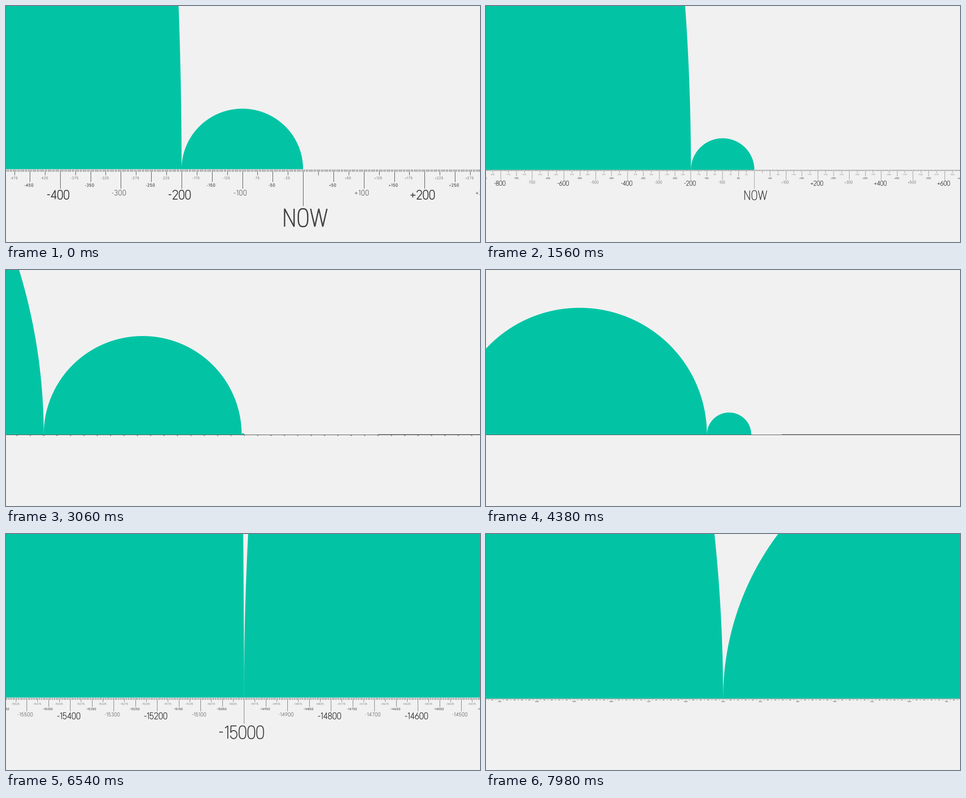
These frames come from a looping animation (1058 by 529 pixels, 8 s). A matplotlib script:

```python
import numpy as np
import matplotlib.pyplot as plt
from matplotlib.animation import FuncAnimation
from matplotlib.collections import LineCollection

W, H, DPI = 1058, 529, 92
PT = 72 / DPI
BG, GREEN, INK = "#f1f1f1", "#02c4a5", "#333333"
CX, CY = 529, 369          # zoom pivot in pixels
FULL = 1.356               # pixels per year when zoomed in
STEP, LOOP, TICK = 60, 8000, 20
PAN = (3125, 5400)
VIEW_A, VIEW_B = -98.9, -15002.2
SPANS = [(-100000, -15000), (-15000, -200), (-200, 0)]

# (ms, log of relative zoom)
ZOOM = np.array([
    (540, 0), (600, -.006), (1260, -.335), (1560, -.65), (2220, -1.715),
    (2700, -2.792), (3060, -3.816), (3450, -4.9), (3800, -5.4),
    (4080, -5.48), (4380, -5.312), (4740, -3.17), (5400, 0), (5460, 0)])
ZT, ZV = ZOOM.T
ZM = np.gradient(ZV, ZT)

# spacing, skip multiples of, tick length, label (y, cap, stroke, tracking, dx, colour)
LEVELS = [
    (1000, None, 60.5, (105.5, 40, 3.0, 0, 0, "#444444")),
    (200, 1000, 31.7, (54, 20, 2.0, .02, -4.7, "#444444")),
    (100, 200, 31.7, (49.5, 11.7, 1.35, .1, -5, "#808080")),
    (50, 100, 20.6, (32.5, 6.4, 1.25, .22, -2.5, "#6c6c6c")),
    (25, 50, 9.6, (16.5, 5.4, .95, .22, -2, "#969696")),
    (2.5, 25, 4, None),
]


def arc(cx, cy, rx, ry, a0=0, a1=360, power=1, n=15):
    a = np.radians(np.linspace(a0, a1, n))
    c, s = np.cos(a), np.sin(a)
    return np.column_stack([cx + rx * np.sign(c) * abs(c) ** power,
                            cy + ry * np.sign(s) * abs(s) ** power])


def line(*points):
    return np.array(points, float)


RING = arc(.25, .5, .25, .5, power=.72, n=33)
GLYPHS = {
    "0": [RING],
    "1": [line((0, .84), (.2, 1), (.2, 0))],
    "2": [np.vstack([arc(.25, .74, .25, .26, 175, -30), line((0, 0), (.5, 0))])],
    "3": [arc(.25, .76, .23, .24, 165, -90), arc(.25, .26, .25, .26, 90, -165)],
    "4": [line((.4, 0), (.4, 1), (0, .26), (.53, .26))],
    "5": [np.vstack([line((.46, 1), (.06, 1), (.03, .48)),
                     arc(.25, .32, .25, .32, 130, -165)])],
    "6": [arc(.25, .3, .25, .3), line((.01, .36), (.36, 1))],
    "7": [line((0, 1), (.5, 1), (.17, 0))],
    "8": [arc(.25, .76, .22, .24), arc(.25, .26, .25, .26)],
    "9": [arc(.25, .7, .25, .3), line((.49, .64), (.14, 0))],
    "+": [line((0, .45), (.5, .45)), line((.25, .2), (.25, .7))],
    "-": [line((0, .5), (.28, .5))],
    "N": [line((0, 0), (0, 1), (.5, 0), (.5, 1))],
    "O": [RING],
    "W": [line((0, 1), (.22, 0), (.43, 1), (.64, 0), (.86, 1))],
}
ADVANCE = {"1": .38, "-": .43, "N": .72, "W": 1.01}
EM = 1.06                  # glyph unit width relative to cap height


def zoom(t):
    """Cubic Hermite through the zoom keys."""
    i = int(np.clip(np.searchsorted(ZT, t, "right") - 1, 0, len(ZT) - 2))
    h = ZT[i + 1] - ZT[i]
    u = (t - ZT[i]) / h
    v = ((1 + 2 * u) * (1 - u) ** 2 * ZV[i] + u * (1 - u) ** 2 * h * ZM[i]
         + u * u * (3 - 2 * u) * ZV[i + 1] + u * u * (u - 1) * h * ZM[i + 1])
    return FULL * np.exp(v)


def ease(u):
    u = min(max(u, 0), 1)
    return 4 * u ** 3 if u < .5 else 1 - 4 * (1 - u) ** 3


def camera(t):
    if t >= 5880:
        return zoom(t - 5280), VIEW_B
    t = min(max(t, 540), 5400)
    u = ease((t - PAN[0]) / (PAN[1] - PAN[0]))
    return zoom(t), VIEW_A + (VIEW_B - VIEW_A) * u


def caption(year):
    if year == 0:
        return "NOW"
    if year == 25:
        return ""
    return "+50" if year == 75 else f"{year:+d}"


def text_strokes(text, x, y, cap, tracking):
    """Strokes of a label centred on x, y."""
    em = EM * cap
    steps = [ADVANCE.get(c, .65) + tracking for c in text]
    left = x - em * (sum(steps) - .15 - tracking) / 2
    out = []
    for char, step in zip(text, steps):
        for stroke in GLYPHS[char]:
            out.append(stroke * (em, -cap) + (left, y + cap / 2))
        left += step * em
    return out


def dome(a, b, s, view, base):
    """Visible part of the half circle between two years."""
    r = (b - a) / 2 * s
    mid = CX + ((a + b) / 2 - view) * s
    th = np.linspace(0, np.arcsin(min(1, (base + 5) / r)), 120)
    dx, y = r * np.cos(th), base - r * np.sin(th)
    x = np.concatenate([mid + dx, (mid - dx)[::-1]])
    return np.column_stack([np.clip(x, -60, W + 60), np.concatenate([y, y[::-1]])])


fig = plt.figure(figsize=(W / DPI, H / DPI), dpi=DPI, facecolor=BG)
ax = fig.add_axes([0, 0, 1, 1])
ax.set_xlim(0, W)
ax.set_ylim(H, 0)
ax.axis("off")

domes = [ax.fill([0, 1, 1], [0, 0, 1], color=GREEN, lw=0)[0] for _ in SPANS]
strip, = ax.plot([], [], color=INK, solid_capstyle="butt")
far_strip, = ax.plot([], [], color=INK, lw=PT, alpha=.6, solid_capstyle="butt")
ticks = LineCollection([], colors=INK, capstyle="butt")
ax.add_collection(ticks, autolim=False)
labels = []
for *_, style in LEVELS:
    if style:
        labels.append(LineCollection([], colors=style[5], capstyle="butt",
                                     joinstyle="miter"))
        ax.add_collection(labels[-1], autolim=False)
shown = {"t": None}


def build(t):
    s, view = camera(t)
    rel = s / FULL
    base = CY - 2.4 * s

    for patch, (a, b) in zip(domes, SPANS):
        patch.set_xy(dome(a, b, s, view, base))

    segments = []
    margin = 110 / s
    for k, (gap, skip, length, style) in enumerate(LEVELS):
        strokes = []
        if gap * s >= 1.5:
            first = np.ceil((view - CX / s - margin) / gap)
            last = np.floor((view + CX / s + margin) / gap)
            years = np.arange(first, last + 1) * gap
            if skip:
                years = years[years % skip != 0]
            xs = CX + (years - view) * s
            segments += [((x, base), (x, base + length * s)) for x in xs]
            if style and style[1] * rel >= .7:
                y, cap, width, tracking, dx, _ = style
                for year, x in zip(years.astype(int), xs):
                    shift = dx if k else (6 if year == 0 else -8)
                    strokes += text_strokes(caption(year), x + shift * rel,
                                            CY + y * rel, cap * rel, tracking)
                labels[k].set_linewidth(max(width * rel, .3) * PT)
        if style:
            labels[k].set_segments(strokes)
    ticks.set_segments(segments)
    ticks.set_linewidth(max(.92 * rel, .4) * PT)

    # the finest marks merge into a line when they get too dense
    dense = 2.5 * s < 1.5
    height = max(4 * s, 1)
    y = base - .8 + height / 2
    strip.set_data([0, W] if dense else [], [y, y] if dense else [])
    strip.set_linewidth(height * PT)
    strip.set_alpha(float(np.interp(s, [.03, .08], [.9, .3])))
    edge = CX + (10000 - view) * s
    far = s < .1 and edge < W
    far_strip.set_data([edge, W] if far else [], [base - 1.3] * 2 if far else [])


def update(frame):
    t = frame * TICK // STEP * STEP
    if shown["t"] != t:
        build(t)
        shown["t"] = t
    return []


def reset():
    shown["t"] = None
    return update(0)


anim = FuncAnimation(fig, update, frames=LOOP // TICK, init_func=reset,
                     interval=TICK, repeat=True, repeat_delay=0)
plt.show()
```
